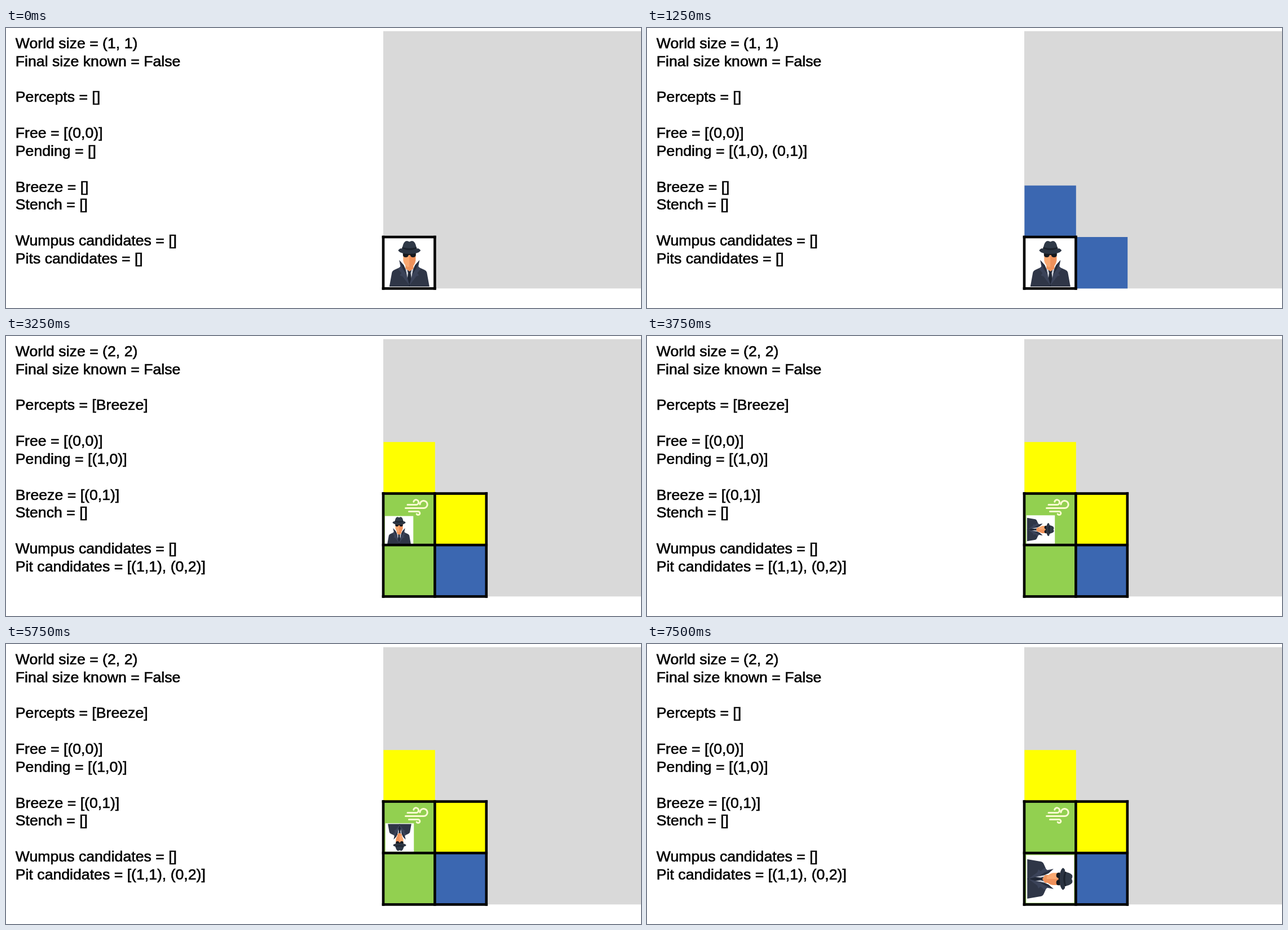
An HTML page with a canvas for the animation above (8000 ms loop, 1126 by 497 pixels).

```html
<!DOCTYPE html>
<html lang="en">
<head>
<meta charset="utf-8">
<title>Grid world agent</title>
<style>
html, body { margin: 0; width: 100%; height: 100%; overflow: hidden; background: #fff; }
canvas { display: block; }
</style>
</head>
<body>
<canvas id="stage" width="1126" height="497"></canvas>
<script>
const ctx = document.getElementById('stage').getContext('2d');
const LOOP = 8000, STEP = 1250;
const CELL = 91.4, LEFT = 669, BOTTOM = 462.4, LINE = 4.6;
const GREEN = '#92d050', BLUE = '#3b67b1', YELLOW = '#ffff00';

const start = { size: 1, percepts: '', pending: '', breeze: '', pits: 'Pits candidates = []', cells: [[0, 0, '#fff']] };
const found = {
  size: 2, percepts: 'Breeze', pending: '(1,0)', breeze: '(0,1)', pits: 'Pit candidates = [(1,1), (0,2)]',
  cells: [[0, 0, GREEN], [0, 1, GREEN], [1, 0, BLUE], [1, 1, YELLOW], [0, 2, YELLOW]]
};
const back = { ...found, percepts: '' };

// spy: centre x, centre y, picture size, quarter turns
const scenes = [
  { ...start, spy: [715.3, 418, 86, 0] },
  { ...start, pending: '(1,0), (0,1)', cells: [...start.cells, [1, 0, BLUE], [0, 1, BLUE]], spy: [715.3, 418, 86, 0] },
  { ...found, spy: [697, 344.8, 50.5, 0] },
  { ...found, spy: [698, 343.5, 50.5, 1] },
  { ...found, spy: [698, 343.5, 50.5, 2] },
  { ...back, spy: [714.8, 417, 85, 2] },
  { ...back, spy: [714.8, 417, 85, 1] }
];

function shape(path, color) {
  ctx.fillStyle = color;
  ctx.fill(new Path2D(path));
}

function rect(x, y, w, h, color) {
  ctx.fillStyle = color;
  ctx.fillRect(x, y, w, h);
}

function drawText(s) {
  const lines = [
    `World size = (${s.size}, ${s.size})`, 'Final size known = False', '',
    `Percepts = [${s.percepts}]`, '',
    'Free = [(0,0)]', `Pending = [${s.pending}]`, '',
    `Breeze = [${s.breeze}]`, 'Stench = []', '',
    'Wumpus candidates = []', s.pits
  ];
  ctx.font = '26.67px "Liberation Sans", Arial, sans-serif';
  ctx.fillStyle = ctx.strokeStyle = '#000';
  ctx.lineWidth = 0.6;
  lines.forEach((line, i) => {
    const y = 35.8 + i * 31.84;
    ctx.fillText(line, 16.8, y);
    ctx.strokeText(line, 16.8, y);
  });
}

function drawCells(cells) {
  for (const [col, row, color] of cells) {
    rect(LEFT + 0.4 + col * CELL, BOTTOM - (row + 1) * CELL, CELL, CELL, color);
  }
}

function drawLines(n) {
  const span = n * CELL + LINE, half = LINE / 2;
  for (let i = 0; i <= n; i++) {
    rect(LEFT + i * CELL - half, BOTTOM - n * CELL - half, LINE, span, '#000');
    rect(LEFT - half, BOTTOM - i * CELL - half, span, LINE, '#000');
  }
}

function drawWind() {
  ctx.strokeStyle = '#fdfbd2';
  ctx.lineWidth = 3;
  ctx.lineCap = 'round';
  ctx.stroke(new Path2D(
    'M712 299.6H727A4.4 4.4 0 1 0 722.8 294.2' +
    'M708.5 305.6H740.5A6.6 6.6 0 1 0 734 298.7' +
    'M714.5 311.6H731A3 3 0 1 1 728.2 316'));
}

function drawSpy([x, y, size, turns]) {
  ctx.save();
  ctx.translate(x, y);
  ctx.rotate(turns * Math.PI / 2);
  ctx.scale(size / 86, size / 86);
  rect(-43, -43, 86, 86, '#fff');
  // coat
  shape('M-35.5 41L-31 16Q-30 12.5 -26 11L-15 6L0 20L15 6L26 11Q30 12.5 31 16L35.5 41Z', '#2f3647');
  // shirt and tie
  shape('M-8 8L0 14L8 8L8 20L0 38L-8 20Z', '#cfd3dc');
  shape('M-3.5 12H3.5L2.2 17L4 30L0 38L-4 30L-2.2 17Z', '#202736');
  // neck and face
  shape('M-7 -4H7V9L0 14L-7 9Z', '#ee965f');
  shape('M-11 -20H11V-5Q9.5 2 4 6H-4Q-9.5 2 -11 -5Z', '#f9a871');
  shape('M0 -20H11V-5Q9.5 2 7 4V9L0 14Z', '#ef915b');
  // collar and lapels
  for (const side of [-1, 1]) {
    ctx.save();
    ctx.scale(side, 1);
    shape('M18 -6L10 3L7 10L4 23L0 39L12 23L17 21L14 17L20 10L16 5Z', '#3b4359');
    shape('M18 -6L10 3L7 10L5 20L12 9Z', '#272e3e');
    ctx.restore();
  }
  rect(-0.5, 37, 1, 4, '#1d2532');
  // glasses
  shape('M-11.5 -18H11.5V-15Q11 -11 6.5 -11Q2 -11 1.5 -15H-1.5Q-2 -11 -6.5 -11Q-11 -11 -11.5 -15Z', '#15191f');
  // hat
  shape('M-13 -24Q-12 -36 -7 -39.5Q-3.5 -41 0 -38.5Q3.5 -41 7 -39.5Q12 -36 13 -24Z', '#2f3947');
  shape('M-12.8 -29Q0 -25 12.8 -29L13.5 -23Q0 -19 -13.5 -23Z', '#1b222d');
  shape('M-20 -23Q-17 -28 -13 -26.5Q0 -21 13 -26.5Q17 -28 20 -23Q16 -17 0 -17Q-16 -17 -20 -23Z', '#2b3442');
  ctx.restore();
}

function draw(s) {
  rect(0, 0, 1126, 497, '#fff');
  rect(669, 5.6, 457, 456.7, '#d9d9d9');
  drawText(s);
  drawCells(s.cells);
  if (s.breeze) drawWind();
  drawSpy(s.spy);
  drawLines(s.size);
}

function tick() {
  draw(scenes[Math.floor(performance.now() % LOOP / STEP)]);
  requestAnimationFrame(tick);
}
tick();
</script>
</body>
</html>
```
